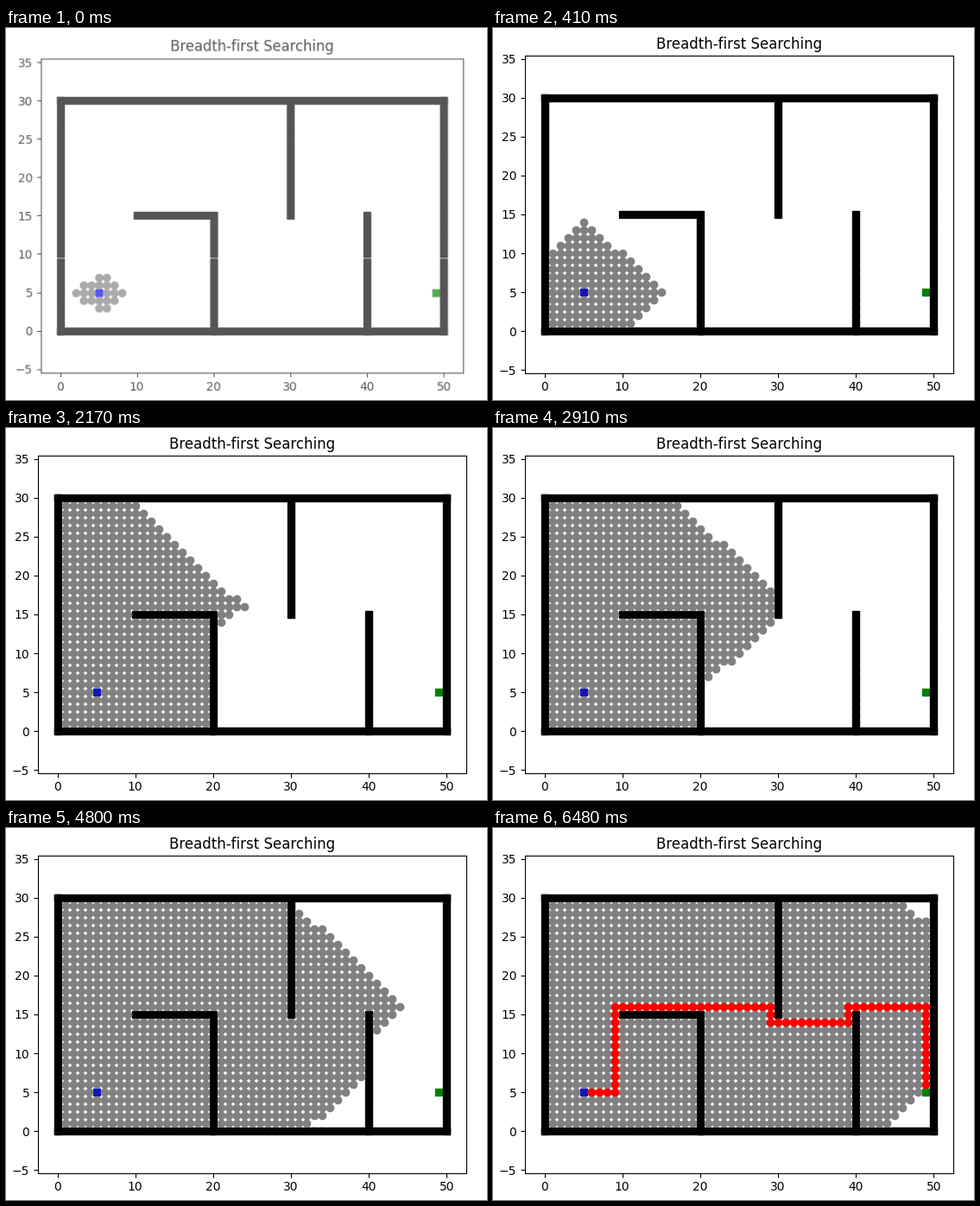
A matplotlib script for the animation above (7.82 s loop, 557 px wide and 431 px high).

```python
import numpy as np
import matplotlib.pyplot as plt
from matplotlib.animation import FuncAnimation

W, H, DPI = 557, 431, 100
LOOP, STEP = 7820, 20
START, GOAL = (5, 5), (49, 5)
COLS, ROWS = 50, 30
MOVES = [(1, 0), (-1, 0), (0, 1), (0, -1)]

LEFT, RIGHT = 37, 533            # axes edges in pixels
OPENING = (31.6, 401.2)          # top and bottom while the window opens
SETTLED = (32.24, 399.6)         # top and bottom afterwards
UNIT = (RIGHT - LEFT) / (COLS + 5)

ZOOM, SHIFT_X, SHIFT_Y, FADE = 0.984, 4.4, 4.8, 2 / 3

# How many cells are visited at each redraw, and when it happens (ms).
COUNTS = [20, *range(20, 441, 20), *range(450, 691, 30), *range(700, 1301, 50)]
TIMES = [
    0, 30, 90, 150, 220, 280, 340, 410, 460, 540, 610, 690, 770,
    880, 970, 1060, 1160, 1250, 1330, 1440, 1550, 1660, 1740,
    1890, 1970, 2170, 2300, 2450, 2580, 2760, 2910, 3040, 3190,
    3420, 3600, 3830, 4060, 4290, 4520, 4800, 5030, 5310, 5590,
    5870, 6150, 6480,
]


def build_walls():
    walls = []
    for x in range(COLS + 1):
        walls += [(x, 0), (x, ROWS)]
    for y in range(ROWS + 1):
        walls += [(0, y), (COLS, y)]
    walls += [(x, 15) for x in range(10, 21)]
    walls += [(20, y) for y in range(15)]
    walls += [(30, y) for y in range(15, 30)]
    walls += [(40, y) for y in range(16)]
    return walls


def search(walls):
    """Breadth-first search: cells in visiting order and the path found."""
    blocked = set(walls)
    parent = {START: None}
    queue = [START]
    for cell in queue:
        if cell == GOAL:
            break
        for dx, dy in MOVES:
            nxt = (cell[0] + dx, cell[1] + dy)
            if nxt not in blocked and nxt not in parent:
                parent[nxt] = cell
                queue.append(nxt)
    visited = queue[1:queue.index(GOAL)]
    path = []
    cell = parent[GOAL]
    while cell != START:
        path.append(cell)
        cell = parent[cell]
    return np.array(visited), np.array(path[::-1])


def place(top, bottom):
    """Set the axes box and keep equal scales on both axes."""
    height = bottom - top
    ax.set_position([LEFT / W, 1 - bottom / H, (RIGHT - LEFT) / W, height / H])
    half = height / UNIT / 2
    ax.set_xlim(-2.5, COLS + 2.5)
    ax.set_ylim(ROWS / 2 - half, ROWS / 2 + half)


walls = build_walls()
visited, path = search(walls)
COUNTS.append(len(visited))

fig = plt.figure(figsize=((W + 1e-4) / DPI, (H + 1e-4) / DPI), dpi=DPI,
                 facecolor="white")
ax = fig.add_axes([0.1, 0.1, 0.8, 0.8])
ax.set_title("Breadth-first Searching")
start_mark, = ax.plot(*START, "bs")
ax.plot(*GOAL, "gs")
ax.plot(*zip(*walls), "sk")
dots, = ax.plot(*visited[:COUNTS[0]].T, "o", color="gray")
trail, = ax.plot([], [], "o", color="red")
ax.set_xticks(range(0, COLS + 1, 10))
ax.set_yticks(range(-5, 36, 5))

# Snapshot of the first state, shown smaller and paler as the window opens.
place(*OPENING)
fig.canvas.draw()
shot = np.asarray(fig.canvas.buffer_rgba())[..., :3] / 255.0
shot = 1 - FADE * (1 - shot)

place(*SETTLED)
start_mark.set_color("#1212b8")

cover = fig.add_axes([0, 0, 1, 1])
cover.axis("off")
cover.imshow(shot, aspect="auto", interpolation="bilinear",
             extent=(SHIFT_X, SHIFT_X + ZOOM * W, SHIFT_Y + ZOOM * H, SHIFT_Y))
cover.set_xlim(0, W)
cover.set_ylim(H, 0)


def update(i):
    now = i * STEP + STEP / 2
    state = int(np.searchsorted(TIMES, now, side="right")) - 1
    opening = state == 0
    cover.set_visible(opening)
    ax.set_visible(not opening)
    dots.set_data(*visited[:COUNTS[state]].T)
    done = state == len(TIMES) - 1
    trail.set_data(*(path.T if done else ([], [])))
    return dots, trail


anim = FuncAnimation(fig, update, frames=LOOP // STEP, interval=STEP,
                     init_func=lambda: update(0), repeat=True, repeat_delay=0)
plt.show()
```
